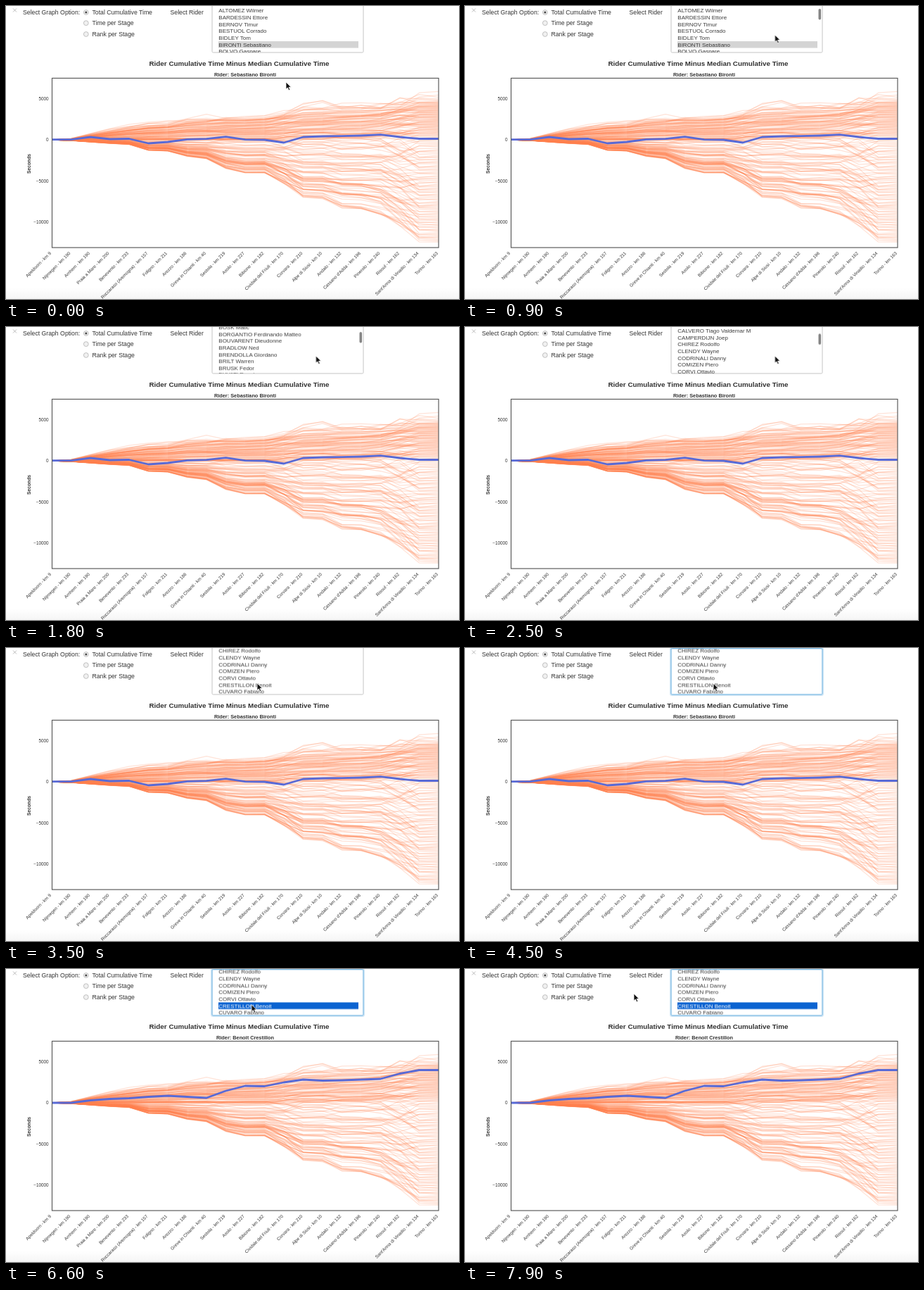
An HTML page that plays this animation: 644 px wide and 416 px high, repeating every 8000 ms.

```html
<!DOCTYPE html>
<html lang="en">
<head>
<meta charset="utf-8">
<title>Rider times</title>
<style>
  html, body { margin: 0; width: 100%; height: 100%; overflow: hidden; background: #fff; }
  svg { display: block; width: 100%; height: 100%; }
  text { font-family: "Liberation Sans", Arial, sans-serif; fill: #333; }
  .ui { font-size: 8.7px; fill: #111; }
  .row { font-size: 8px; fill: #3c3c3c; }
  .tick { font-size: 6.3px; fill: #333; }
  .bold { font-weight: bold; }
  .fan path { fill: none; stroke: #ff7f50; stroke-width: 1.3; stroke-opacity: .22; stroke-linejoin: round; }
  .main { fill: none; stroke: #586ad6; stroke-width: 2.8; stroke-linejoin: round; }

  .list, .thumb, .pick, .ring, .before, .after, .cursor { animation: 8s step-end infinite; }
  .list { animation-name: scroll; }
  .thumb { animation-name: thumb; }
  .pick { animation-name: pick; }
  .ring { animation-name: focus; }
  .before { animation-name: leave; }
  .after { animation-name: enter; }
  .cursor { animation-name: cursor; }

  @keyframes scroll {
    0% { transform: translateY(0); }
    11.25% { transform: translateY(0); animation-timing-function: steps(18); }
    33.75%, 100% { transform: translateY(-185.6px); }
  }
  @keyframes thumb {
    0% { transform: translateY(0); opacity: 0; }
    11.25% { transform: translateY(0); opacity: 1; animation-timing-function: steps(18); }
    33.75% { transform: translateY(6.2px); opacity: 1; }
    37.5% { transform: translateY(6.2px); opacity: 1; animation-timing-function: steps(3); }
    41.25%, 100% { transform: translateY(6.2px); opacity: 0; }
  }
  @keyframes pick { 0% { opacity: 0; } 60%, 100% { opacity: 1; } }
  @keyframes focus { 0% { opacity: 0; } 46.25%, 100% { opacity: 1; } }
  @keyframes leave { 0% { opacity: 1; } 78.75%, 100% { opacity: 0; } }
  @keyframes enter { 0% { opacity: 0; } 78.75%, 100% { opacity: 1; } }
  @keyframes cursor {
    0% { transform: translate(398px, 108px); animation-timing-function: steps(6); }
    7.5% { transform: translate(440.5px, 41px); }
    36.25% { transform: translate(440.5px, 41px); animation-timing-function: steps(6); }
    43.75% { transform: translate(357px, 50px); }
    55% { transform: translate(357px, 50px); animation-timing-function: steps(2); }
    57.5% { transform: translate(349px, 50.5px); }
    91.25% { transform: translate(349px, 50.5px); animation-timing-function: steps(6); }
    98.75%, 100% { transform: translate(240px, 35px); }
  }
</style>
</head>
<body>
<svg viewBox="0 0 644 416" preserveAspectRatio="none">
  <defs>
    <linearGradient id="foot" x1="0" y1="0" x2="0" y2="1">
      <stop offset="0" stop-color="#fff"/><stop offset="1" stop-color="#f5f5f5"/>
    </linearGradient>
    <clipPath id="box"><rect x="293" y="0" width="215" height="65.5"/></clipPath>
    <clipPath id="plot"><rect x="65" y="102" width="550" height="241"/></clipPath>
  </defs>
  <rect y="400" width="644" height="16" fill="url(#foot)"/>

  <path d="M10 3.5l5 5m0-5l-5 5" stroke="#bbb"/>
  <g class="ui">
    <text x="24" y="12">Select Graph Option:</text>
    <text x="122.5" y="12">Total Cumulative Time</text>
    <text x="122.5" y="27">Time per Stage</text>
    <text x="122.5" y="42.7">Rank per Stage</text>
    <text x="233.5" y="12">Select Rider</text>
  </g>
  <g fill="#f0f0f0" stroke="#b4b4b4" stroke-width=".8">
    <circle cx="113.8" cy="9" r="3.4"/>
    <circle cx="113.8" cy="24.2" r="3.4"/>
    <circle cx="113.8" cy="40" r="3.4"/>
  </g>
  <circle cx="113.8" cy="9" r="1.5" fill="#444"/>

  <rect x="293" y="-4" width="215" height="70" rx="1.5" fill="#fff" stroke="#c4c4c4"/>
  <g class="ring" fill="none">
    <rect x="292.5" y=".5" width="216" height="66" rx="2" stroke="#cfe6f6" stroke-width="3"/>
    <rect x="293" y=".5" width="215" height="65.5" rx="1.5" stroke="#7db9e2"/>
  </g>
  <g clip-path="url(#box)"><g class="list" id="list"></g></g>
  <rect class="thumb" x="502.5" y="4" width="3.6" height="15.5" rx="1.8" fill="#858585"/>

  <text class="bold" x="331.5" y="85" font-size="9.87" text-anchor="middle">Rider Cumulative Time Minus Median Cumulative Time</text>
  <g clip-path="url(#plot)">
    <g class="fan" id="fan"></g>
    <path class="main before" id="first"/>
    <path class="main after" id="second"/>
  </g>
  <g class="bold" font-size="7.35" text-anchor="middle">
    <text class="before" x="340" y="100">Rider: Sebastiano Bironti</text>
    <text class="after" x="340" y="100">Rider: Benoit Crestillon</text>
  </g>
  <rect x="65.5" y="102.5" width="549.5" height="240.5" fill="none" stroke="#5c5c5c" stroke-width="1.2"/>
  <g id="ticks" text-anchor="end"></g>
  <text class="bold" font-size="6.7" text-anchor="middle" transform="translate(35 224) rotate(-90)">Seconds</text>

  <path class="cursor" d="M0 0V10.2L2.4 8L4 11.8L5.8 11L4.2 7.3H7.4Z" fill="#111" stroke="#fff" stroke-width=".8"/>
</svg>
<script>
const riders = `ALTOMEZ Wilmer,BARDESSIN Ettore,BERNOV Timur,BESTUOL Corrado,BIDLEY Tom,
BIRONTI Sebastiano,BOLVO Gaspare,BOLFORTH Luke,BONT Davide,BOSK Matic,
BORGANTIO Ferdinando Matteo,BOUVARENT Dieudonne,BRADLOW Ned,BRENDOLLA Giordano,
BRILT Warren,BRUSK Fedor,BUVATI Renato,CALVERO Tiago Valdemar M,CAMPERDIJN Joep,
CHIREZ Rodolfo,CLENDY Wayne,CODRINALI Danny,COMIZEN Piero,CORVI Ottavio,
CRESTILLON Benoit,CUVARO Fabiano`.split(/,\s*/);

const stages = `Apeldoorn - km 9,Nijmegen - km 190,Arnhem - km 190,Praia a Mare - km 200,
Benevento - km 233,Roccaraso (Aremogna) - km 157,Foligno - km 211,Arezzo - km 186,
Greve in Chianti - km 40,Sestola - km 219,Asolo - km 227,Bibione - km 182,
Cividale del Friuli - km 170,Corvara - km 210,Alpe di Siusi - km 10,Andalo - km 132,
Cassano d'Adda - km 196,Pinerolo - km 240,Risoul - km 162,
Sant'Anna di Vinadio - km 134,Torino - km 163`.split(/,\s*/);

const $ = id => document.getElementById(id);
function add(parent, tag, attrs, label) {
  const el = document.createElementNS("http://www.w3.org/2000/svg", tag);
  for (const k in attrs) el.setAttribute(k, attrs[k]);
  if (label) el.textContent = label;
  return parent.appendChild(el);
}

// Rider list
const pitch = 9.63;
function addBar(i, attrs) {
  add($("list"), "rect", { x: 302, y: 1.9 + i * pitch, width: 199, height: 9.5, ...attrs });
}
function addRow(i, attrs) {
  add($("list"), "text", { class: "row", x: 302.3, y: 9.4 + i * pitch, ...attrs }, riders[i]);
}
addBar(5, { fill: "#d4d4d4" });
riders.forEach((_, i) => addRow(i));
addBar(24, { fill: "#0b63d1", class: "pick" });
addRow(24, { class: "row pick", style: "fill:#fff" });

// Axes
const zero = 190, step = 27.5;
const stageX = s => 65 + s * step;
for (const v of [5000, 0, -5000, -10000])
  add($("ticks"), "text", { class: "tick", x: 60.5, y: zero + 2.3 - v * .0117 }, String(v).replace("-", "\u2212"));
stages.forEach((name, s) => add($("ticks"), "text",
  { class: "tick", transform: `translate(${stageX(s) - .5} 351.5) rotate(-45)` }, name));

// Curves: pixel offsets from the median
const line = ys => "M" + ys.map((y, s) => stageX(s) + " " + (zero + y).toFixed(2)).join("L");
const ahead = [0, 2, 10, 17, 23, 27, 29, 35, 37, 40, 40, 42, 49, 55, 56, 56.5, 57, 59, 66, 72, 72];
const behind = [0, 1, 3, 5, 6.5, 15, 16, 23.5, 27, 41, 47, 47, 63, 83, 85, 97, 99, 106, 124, 145, 146];
$("first").setAttribute("d", line([-.3, -.3, -4, -1, -1.5, 5, 3, -.7, -1.3, -4.3, -.4, 0, 4, -4, -5, -5.3, -6, -7.3, -4, -1.5, -1.5]));
$("second").setAttribute("d", line([0, 0, -3.5, -5.5, -6.5, -8.5, -10, -8.5, -7, -17, -24, -23.5, -29, -33, -31.5, -32, -33, -34, -41.5, -46.5, -46.5]));

let seed = 7;
function rnd() {
  seed = (seed * 16807) % 2147483647;
  return seed / 2147483647;
}
function spread(rank, s) {
  const t = Math.abs(1 - 2 * rank);
  if (rank < .5) return -ahead[s] * (.8 * t ** (1.3 - .025 * s) + .2 * t ** 40);
  return behind[s] * t ** (.45 + .025 * s);
}
// Ranks drift backwards from the final standings, most on hard stages
const count = 165;
for (let i = 0; i < count; i++) {
  const ys = [];
  let rank = (i + .5) / count;
  for (let s = 20; s >= 0; s--) {
    ys[s] = spread(rank, s);
    const hard = s ? behind[s] - behind[s - 1] : 0;
    rank = Math.abs(rank + (rnd() - .5) * (.01 + .006 * hard));
    if (rank > 1) rank = 2 - rank;
  }
  add($("fan"), "path", { d: line(ys) });
}
</script>
</body>
</html>
```
